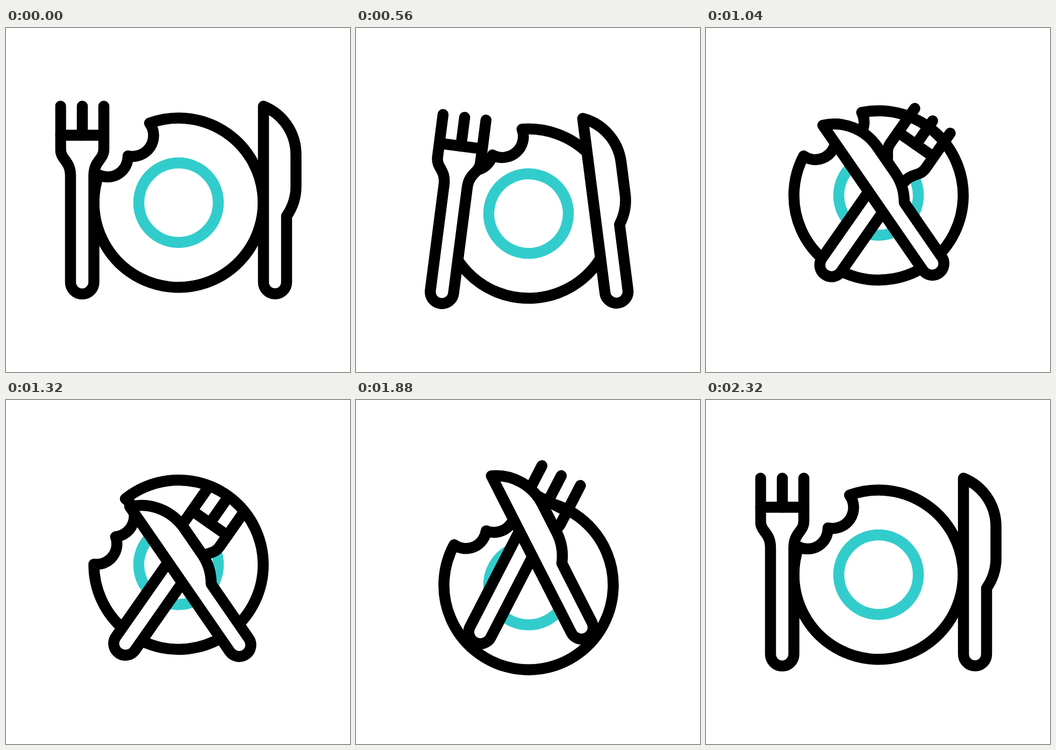
Animation of 640 by 640 pixels, one loop 2400 ms. Source, as an HTML page:

```html
<!DOCTYPE html>
<html lang="en">
<head>
<meta charset="utf-8">
<title>Plate with fork and knife</title>
<style>
  html, body { margin: 0; height: 100%; overflow: hidden; background: #fff; }
  svg { display: block; width: 100vw; height: 100vh; clip-path: inset(0 0 0 14.3%); }
  path, circle { fill: none; stroke: #000; stroke-width: 20.5; stroke-linecap: round; stroke-linejoin: round; }
  .solid { fill: #fff; }
  .ring { stroke: #3cc; }
</style>
</head>
<body>
<svg viewBox="0 0 640 640">
  <g id="plate">
    <path d="M267.1 177A157.5 157.5 0 1 1 172.3 273.2A38 38 0 0 0 227 238A39 39 0 0 0 267.1 177"/>
    <circle class="ring" cx="321" cy="325" r="74"/>
  </g>
  <g id="fork">
    <path class="solid" d="M101.5 199.5V225C101.5 246 120 246 120 275V473a21.75 21.75 0 0 0 43.5 0V275C163.5 246 182 246 182 225V199.5Z"/>
    <path d="M101.5 145.5V199.5M142 145.5V199.5M182 145.5V199.5"/>
  </g>
  <g id="knife">
    <path class="solid" d="M479 145.5V473a21.5 21.5 0 0 0 43 0V350C533 334 539.5 315 539.5 295V236C539.5 195 515 160 479 145.5Z"/>
  </g>
</svg>
<script>
const LOOP = 2400;

// Each track is a list of [time, value] keys, eased in and out between keys.
const track = (times, values) => times.map((t, i) => [t, values[i]]);
const beats = [0, 360, 1040, 1340, 1690, 2320];

const parts = [
  {
    id: 'plate', pivot: [321, 325],
    x: [[0, 0]],
    y: track([170, 720, 1200, 1675, 2320], [0, 25.5, -27, 25.5, 0]),
    turn: track([200, 800, 1420, 1760, 2320], [0, 24, -22, 10.5, 0])
  },
  {
    id: 'fork', pivot: [142, 320],
    x: track(beats, [0, 0, 179.5, 168, 205, 0]),
    y: track(beats, [0, 25.5, -4.3, 8, -31, 0]),
    turn: track(beats, [0, 0, 35, 35, 35, 0])
  },
  {
    id: 'knife', pivot: [510, 320],
    x: track(beats, [0, 0, -168, -155, -194, 0]),
    y: track(beats, [0, 25.5, -13, 4.6, -48, 0]),
    turn: track(beats, [0, 0, -34.6, -34.6, -34.6, 0])
  }
];

function valueAt(keys, time) {
  const next = keys.findIndex(([t]) => t > time);
  if (next < 0) return keys[keys.length - 1][1];
  if (next === 0) return keys[0][1];
  const [t0, v0] = keys[next - 1], [t1, v1] = keys[next];
  const p = (time - t0) / (t1 - t0);
  return v0 + (v1 - v0) * p * p * (3 - 2 * p);
}

function draw(now) {
  const time = now % LOOP;
  for (const { id, pivot: [px, py], x, y, turn } of parts) {
    const dx = valueAt(x, time), dy = valueAt(y, time), angle = valueAt(turn, time);
    document.getElementById(id).setAttribute('transform',
      `translate(${dx} ${dy}) rotate(${angle} ${px} ${py})`);
  }
}

const start = performance.now();
function tick() {
  draw(performance.now() - start);
  requestAnimationFrame(tick);
}
tick();
</script>
</body>
</html>
```
